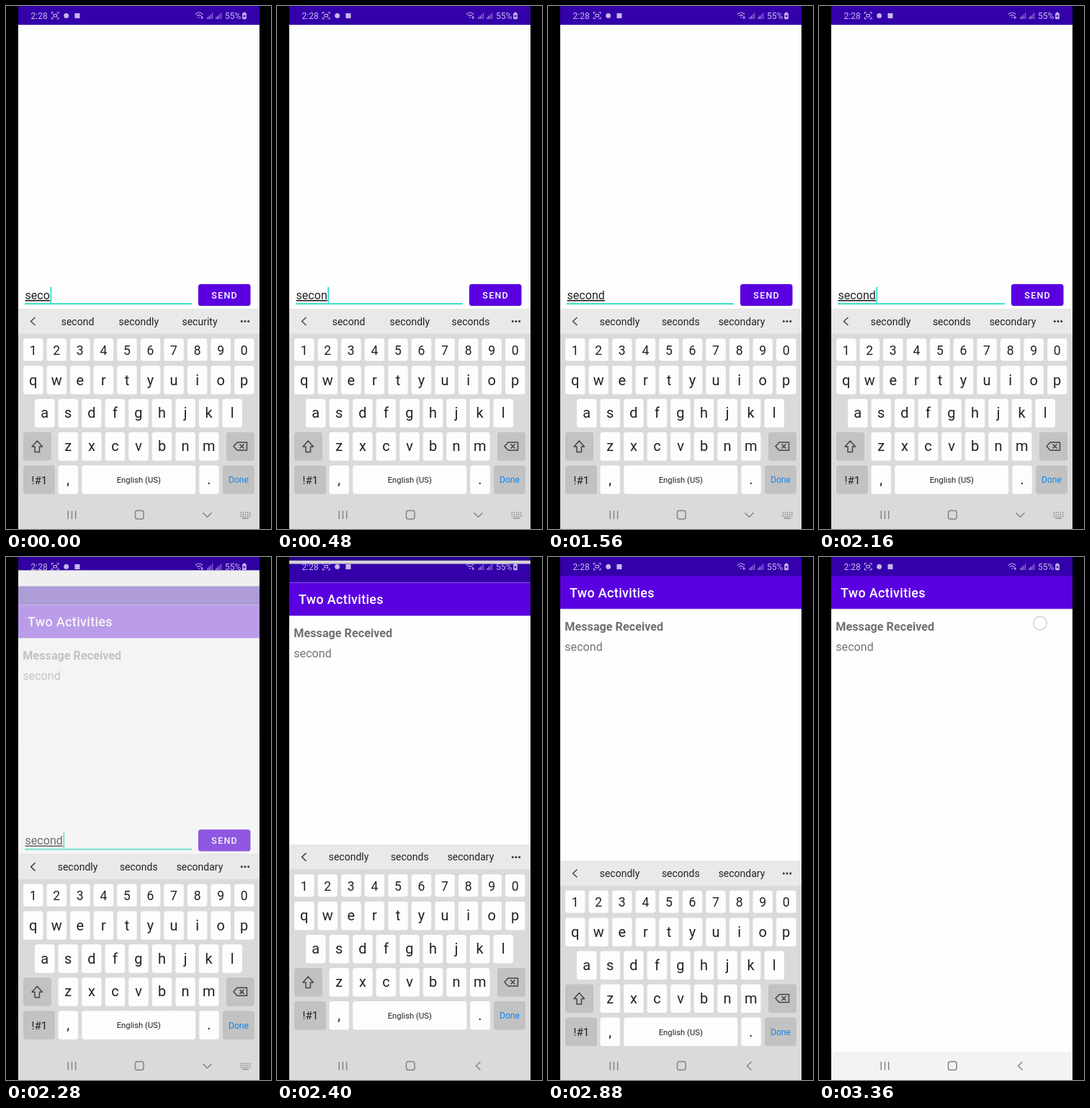
These frames come from a looping animation (368x724 px, 3480 ms). An HTML page:

```html
<!DOCTYPE html>
<html lang="en">
<head>
<meta charset="utf-8">
<style>
html, body { margin: 0; height: 100%; overflow: hidden; background: #000; }
svg { display: block; width: 100vw; height: 100vh; font-family: Roboto, Arial, sans-serif; }
.line { fill: none; stroke: #444; stroke-width: 1.5; stroke-linejoin: round; }
.nav { fill: none; stroke: #858585; stroke-width: 1.5; stroke-linejoin: round; }
.stat { fill: none; stroke: #c6b8ec; stroke-width: 1.1; }
</style>
</head>
<body>
<svg id="stage" viewBox="0 0 368 724"></svg>
<script>
const STEP = 120, LOOP = 3480;
const SEND = 1800, SLIDE = 2240, SLIDE_LEN = 353, SETTLED = 2640, CLOSE = 2880, CLOSED = 3000;

const rect = (x, y, w, h, fill, r = 0) =>
  `<rect x="${x}" y="${y}" width="${w}" height="${h}" rx="${r}" fill="${fill}"/>`;
const text = (x, y, size, str, fill = '#222', attrs = 'text-anchor="middle"') =>
  `<text x="${x}" y="${y}" font-size="${size}" fill="${fill}" ${attrs}>${str}</text>`;
const path = (cls, d) => `<path class="${cls}" d="${d}"/>`;
const group = (id, body) => `<g id="${id}">${body}</g>`;

function keyRow(chars, x, y, h, size, drop) {
  return [...chars].map((c, i) => {
    const left = x + i * 32.56;
    return rect(left, y, 27.5, h, '#fdfdfd', 3.5) + text(left + 13.7, y + drop, size, c);
  }).join('');
}

const oldScreen =
  rect(17, 0, 335, 724, '#fefefe') + rect(17, 0, 335, 26, '#3300aa') +
  text(26.5, 406, 16.1, '', '#222', 'id="typed" text-decoration="underline"') +
  rect(26, 411.3, 232, 1.9, '#2bdcc4') +
  rect(0, 389, 1.8, 22, '#2bdcc4').replace('<rect', '<rect id="caret"') +
  rect(267, 386, 72.5, 30, '#ddd', 3.5) + rect(267, 385, 72.5, 30, '#5a00e0', 3.5) +
  text(303.7, 405, 12.5, 'SEND', '#fff', 'text-anchor="middle" font-weight="500" letter-spacing="1.25"');

const newScreen =
  rect(17, 0, 335, 724, '#fefefe') + rect(17, 0, 335, 26, '#3300aa') +
  rect(17, 26, 335, 46.5, '#d8d4e2') + rect(17, 26, 335, 45.7, '#5a00e0') +
  text(30, 56, 18, 'Two Activities', '#fff', 'font-weight="500" letter-spacing=".3"') +
  text(23.3, 101.5, 16.2, 'Message Received', '#707070', 'font-weight="700"') +
  text(23.3, 130, 16.1, 'second', '#757575', '');

const keyboard =
  rect(17, 419, 335, 330, '#dadada') + rect(17, 419, 335, 34.5, '#e9e9e9') +
  path('line', 'M40.5 431L34.5 436.5L40.5 442') +
  [99.5, 184.3, 269].map((x, i) => text(x, 441.5, 14, '', '#222', `id="hint${i}" text-anchor="middle"`)).join('') +
  [327.3, 332, 336.7].map(x => `<circle cx="${x}" cy="436.5" r="1.5" fill="#333"/>`).join('') +
  keyRow('1234567890', 24, 460.3, 31, 17.6, 22.5) +
  keyRow('qwertyuiop', 24, 498, 39.5, 20, 26.5) +
  keyRow('asdfghjkl', 40, 544, 39.5, 20, 26.3) +
  keyRow('zxcvbnm', 72.6, 590, 39.5, 20, 26) +
  rect(24, 590, 39, 39.5, '#c2c2c2', 3.5) + rect(306, 590, 39, 39.5, '#c2c2c2', 3.5) +
  path('line', 'M43.3 602L50.5 610H46.5V617.5H40V610H36Z') +
  path('line', 'M316 609.5L321 604H334.5V615H321ZM324.5 606.5L330.5 612.5M330.5 606.5L324.5 612.5') +
  rect(24, 636, 44, 39.5, '#c2c2c2', 3.5) + text(46.5, 661.5, 15.2, '!#1') +
  keyRow(',', 72.6, 636, 39.5, 20, 26) +
  rect(105.3, 636, 158, 39.5, '#fdfdfd', 3.5) + text(184.3, 660, 11.3, 'English (US)') +
  keyRow('.', 268.3, 636, 39.5, 20, 26) +
  rect(301, 636, 44, 39.5, '#c2c2c2', 3.5) + text(323, 660.3, 12.2, 'Done', '#1584e8');

let dots = '';
for (let i = 0; i < 15; i++)
  dots += rect(325.5 + i % 5 * 3.1, 700.5 + Math.floor(i / 5) * 2.7, 1.7, 1.3, '#858585');

const navIcons =
  path('nav', 'M86.3 698.8V710.3M91.5 698.8V710.3M96.7 698.8V710.3') +
  '<rect class="nav" x="179.5" y="698.6" width="11.6" height="11.6" rx="3"/>' +
  group('down', path('nav', 'M273.5 701.5L279.5 707.5L285.5 701.5') + dots + rect(328, 708.5, 9, 1.3, '#858585')) +
  group('back', path('nav', 'M282.5 698.8L276.5 704.5L282.5 710.3'));

const bars = x => [0, 1, 2, 3].map(i => rect(x + i * 2.2, 15.5 - i * 2, 1.1, 2.5 + i * 2, i < 2 ? '#c6b8ec' : '#8f78d2')).join('');
const statusIcons =
  text(34.5, 17.8, 12.1, '2:28', '#c6b8ec', '') + text(304, 17.8, 12.1, '55%', '#c6b8ec', '') +
  path('stat', 'M63.5 11V8.7H66M70.5 8.7H73V11M73 15.5V17.8H70.5M66 17.8H63.5V15.5M66 11.5H70.5V15H66Z') +
  '<circle cx="83.7" cy="13.4" r="3.4" fill="#c6b8ec"/>' + rect(95.5, 10, 7, 7, '#c6b8ec') +
  path('stat', 'M263 11.5Q268 6.5 273 11.5M265 13.8Q268 10.8 271 13.8M267 15.8H269M272 14V18M270.5 16H274') +
  bars(279.5) + bars(291.5) +
  rect(328.2, 9.8, 5.6, 8.4, '#c6b8ec', 1) + rect(329.7, 8.6, 2.6, 2, '#c6b8ec') +
  path('stat', 'M331 12V16M329.3 14H332.7').replace('class="stat"', 'stroke="#3300aa"');

stage.innerHTML =
  rect(17, 0, 335, 724, '#fefefe') + group('oldView', oldScreen) +
  group('dim', rect(17, 0, 335, 724, '#000')) + group('newView', newScreen) +
  rect(17, 685, 335, 39, '#f3f3f3') + group('keys', keyboard) + navIcons + statusIcons +
  '<circle id="ring" r="9.3" fill="#fff" fill-opacity=".55" stroke="#cfcde2" stroke-width="1.4"/>' +
  rect(0, 0, 17, 724, '#000') + rect(352, 0, 16, 724, '#000');

const $ = id => document.getElementById(id);
const show = (id, on) => $(id).setAttribute('opacity', +on);
const shift = (id, y) => $(id).setAttribute('transform', `translate(0 ${y})`);

// Touches: start, end, x, y
const taps = [[120, 360, 249.5, 609], [840, 1080, 118.5, 561.5], [SEND, 2040, 303, 400], [3360, LOOP, 307, 91.5]];
const hints = [
  [1320, ['secondly', 'seconds', 'secondary']],
  [480, ['second', 'secondly', 'seconds']],
  [0, ['second', 'secondly', 'security']]
];

function draw(t) {
  const typedAt = t >= 1080 ? 1080 : t >= 240 ? 240 : 0;
  $('typed').textContent = 'second'.slice(0, typedAt === 1080 ? 6 : typedAt ? 5 : 4);
  $('caret').setAttribute('x', 27 + $('typed').getComputedTextLength());
  show('caret', Math.floor((t - typedAt) / 480) % 2 === 0);
  hints.find(h => t >= h[0])[1].forEach((word, i) => $('hint' + i).textContent = word);

  // Old screen drifts up while the new one rises into place.
  const u = Math.min(1, Math.max(0, (t - SLIDE) / SLIDE_LEN));
  const ease = 1 - (1 - u) ** 3;
  shift('oldView', -25.2 * ease);
  show('dim', ease * 0.2);
  shift('newView', 58 * (1 - ease));
  show('newView', Math.min(1, u * 3));
  shift('keys', t >= CLOSE ? 1.5 : t >= SETTLED ? 0 : -25.2 * ease);
  show('keys', t < CLOSED);
  show('down', t < 2400);
  show('back', t >= 2400);

  const tap = taps.find(([from, to]) => t >= from && t < to);
  show('ring', !!tap);
  if (tap) {
    $('ring').setAttribute('cx', tap[2]);
    $('ring').setAttribute('cy', tap[3]);
  }
}

const start = performance.now();
function tick() {
  const t = (performance.now() - start) % LOOP;
  draw(Math.floor(t / STEP) * STEP);
  requestAnimationFrame(tick);
}
tick();
</script>
</body>
</html>
```
